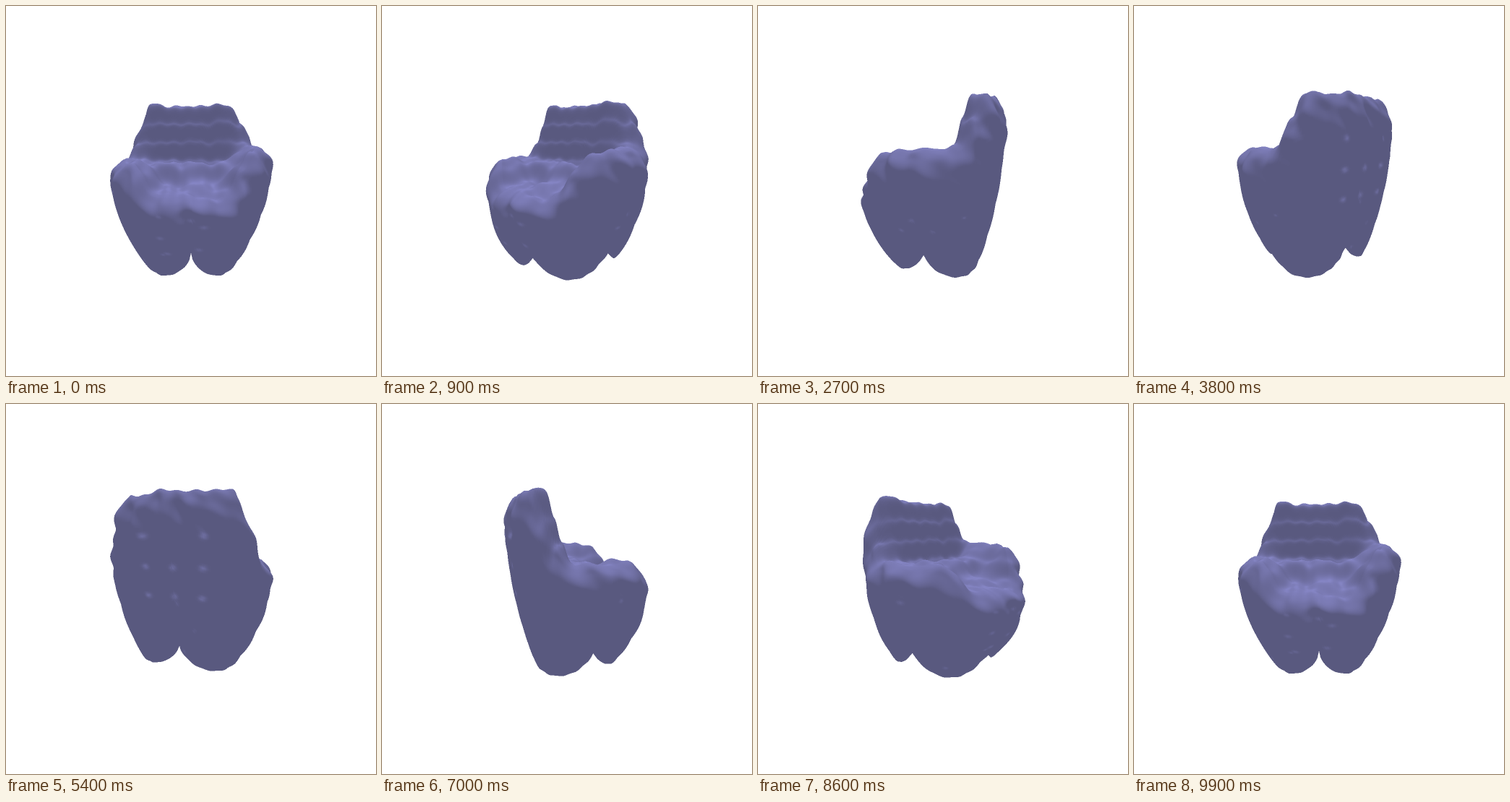
Animation of 512x512 px, one loop 10000 ms. Source, as an HTML page with a canvas:

```html
<!DOCTYPE html>
<html lang="en">
<head>
<meta charset="utf-8">
<title>Turning form</title>
<style>
html, body { margin: 0; width: 100%; height: 100%; overflow: hidden; background: #fff; }
canvas { display: block; width: 512px; height: 512px; }
</style>
</head>
<body>
<canvas id="stage" width="512" height="512"></canvas>
<script>
const STEPS = 100, STEP_MS = 100, TURN = Math.PI * 2, DEG = Math.PI / 180;
const { sin, cos, exp, abs, min, max } = Math;
const clamp = (x, lo, hi) => min(hi, max(lo, x));
const mix = (a, b, f) => a + (b - a) * f;
const smooth = (lo, hi, x) => { const f = clamp((x - lo) / (hi - lo), 0, 1); return f * f * (3 - 2 * f); };

let seed = 11;
const random = () => (seed = (seed * 16807) % 2147483647) / 2147483647;

// Mesh: rings around the vertical axis, first up the wall, then inward over the top
const NA = 260, WALL = 72, CAP = 60, NV = WALL + CAP, N = NA * NV;
const buf = () => new Float32Array(N);
const X = buf(), Y = buf(), Z = buf(), shade = buf(), px = buf(), py = buf(), pz = buf();
const RIM = 0.84, PEAK = 0.8;

const waves = Array.from({ length: 9 }, (_, i) => {
  const dir = random() * TURN, pitch = TURN / (20 + 5 * i);
  return { x: cos(dir) * pitch, z: sin(dir) * pitch, phase: random() * TURN };
});
const lumps = (x, z) => waves.reduce((sum, w) => sum + sin(w.x * x + w.z * z + w.phase), 0);

const radius = a => 99 + 11 * cos(a) - 6 * cos(2 * a) + 4 * cos(3 * a);
// Four feet with narrow gaps between them
const foot = a => -58 - 36 * Math.sqrt(abs(sin(2 * (a + 0.2 * sin(a)))));

// Top surface: sloping seat, two arms and a high back, all slightly terraced
function topHeight(x, z) {
  const seat = 36 - 22 * smooth(0, 70, z) + 4 * sin(z * TURN / 45);
  const low = mix(seat, 50 + 0.08 * x, smooth(30, 70, abs(x)));
  const back = smooth(12, 42, -z) * (1 - smooth(54, 96, abs(x)));
  const h = mix(low, 118, back);
  return h + 2.6 * sin(h * TURN / 26) + 0.9 * lumps(x, z);
}

const bulge = t => t < PEAK
  ? mix(0.66, 1, sin(t / PEAK * TURN / 4) ** 0.8)
  : mix(1, RIM, ((t - PEAK) / (1 - PEAK)) ** 2.5);

function buildBody() {
  for (let i = 0; i < NA; i++) {
    const a = i / NA * TURN, rad = radius(a), sa = sin(a), ca = cos(a);
    const rim = topHeight(RIM * rad * sa, RIM * rad * ca), low = foot(a);
    for (let j = 0; j < NV; j++) {
      const k = i * NV + j;
      let r, h;
      if (j === 0) {
        r = 0.3 * rad; h = -55;
      } else if (j < WALL) {
        const t = (j - 1) / (WALL - 1);
        const rough = smooth(0.6, 0.85, t) * (1 - smooth(0.92, 1, t));
        h = mix(low, rim, t);
        r = rad * bulge(t) + rough * (2 * sin(17 * a) + 1.2 * sin(9 * a + h * 0.2))
          + 0.8 * sin(23 * a + h * 0.12);
      } else {
        r = rad * RIM * (1 - (j - WALL + 1) / CAP);
        h = topHeight(r * sa, r * ca);
      }
      X[k] = r * sa; Y[k] = h; Z[k] = r * ca;
    }
  }
}

// Small ledges: a three by three grid on the back wall, others scattered
const ledges = [];
for (let row = 0; row < 3; row++) for (let col = 0; col < 3; col++) {
  if (row || col !== 1) ledges.push({ a: (158 + 23.5 * col) * DEG, h: 72 - 33 * row, w: 4.6, light: 0.32 });
}
for (let i = 0; i < 16; i++) {
  ledges.push({ a: random() * TURN, h: -75 + 85 * random(), w: 2 + 1.5 * random(), light: 0.18 });
}

function lightBody() {
  for (let i = 0; i < NA; i++) for (let j = 0; j < NV; j++) {
    const k = i * NV + j, a = i / NA * TURN;
    const e = (i + 1) % NA * NV + j, w = (i + NA - 1) % NA * NV + j;
    const n = i * NV + min(j + 1, NV - 1), s = i * NV + max(j - 1, 0);
    const ax = X[e] - X[w], ay = Y[e] - Y[w], az = Z[e] - Z[w];
    const bx = X[n] - X[s], by = Y[n] - Y[s], bz = Z[n] - Z[s];
    const nx = ay * bz - az * by, ny = az * bx - ax * bz, nz = ax * by - ay * bx;
    const up = j === NV - 1 ? 1 : ny / (Math.hypot(nx, ny, nz) || 1);
    let light = 0.56 * max(0, up - 0.2) / 0.8 + 1.5 * max(0, up - 0.95);
    if (j < WALL) for (const l of ledges) {
      const turn = abs(a - l.a), arc = min(turn, TURN - turn) * 95;
      light += l.light * exp(-((arc / l.w) ** 2) - ((Y[k] - l.h) / (l.w * 0.6)) ** 2);
    }
    shade[k] = clamp(light, 0, 0.9);
  }
}

// Camera slightly above the body
const DIST = 350, CE = cos(12 * DEG), SE = sin(12 * DEG);

function project(step) {
  const turn = step * TURN / (STEPS - 1), c = cos(turn), s = sin(turn);
  for (let k = 0; k < N; k++) {
    const x = X[k] * c - Z[k] * s, z = Z[k] * c + X[k] * s;
    const depth = z * CE + Y[k] * SE, m = DIST / (DIST - depth);
    px[k] = (256 + x * m - X0) * 2;
    py[k] = (256 - (Y[k] * CE - z * SE) * m - Y0) * 2;
    pz[k] = depth;
  }
}

// Rasteriser at double size
const X0 = 112, Y0 = 96, W = 576, H = 632;
const sheet = document.createElement("canvas");
sheet.width = W; sheet.height = H;
const sheetCtx = sheet.getContext("2d");
const image = sheetCtx.createImageData(W, H);
const pixels = new Uint32Array(image.data.buffer);
const zbuf = new Float32Array(W * H);
const ramp = Uint32Array.from({ length: 256 }, (_, i) => {
  const g = Math.round(89 + 70 * i / 255), b = Math.round(127 + 110 * i / 255);
  return (255 << 24 | b << 16 | g << 8 | g) >>> 0;
});

function triangle(a, b, c) {
  const ax = px[a], ay = py[a], bx = px[b], by = py[b], cx = px[c], cy = py[c];
  const area = (bx - ax) * (cy - ay) - (by - ay) * (cx - ax);
  if (abs(area) < 1e-6) return;
  const x1 = max(0, Math.ceil(min(ax, bx, cx) - .5)), x2 = min(W - 1, Math.floor(max(ax, bx, cx) - .5));
  const y1 = max(0, Math.ceil(min(ay, by, cy) - .5)), y2 = min(H - 1, Math.floor(max(ay, by, cy) - .5));
  for (let y = y1; y <= y2; y++) for (let x = x1; x <= x2; x++) {
    const u = x + .5 - ax, v = y + .5 - ay;
    const wb = (u * (cy - ay) - v * (cx - ax)) / area;
    const wc = ((bx - ax) * v - (by - ay) * u) / area;
    const wa = 1 - wb - wc;
    if (wa < -1e-4 || wb < -1e-4 || wc < -1e-4) continue;
    const z = wa * pz[a] + wb * pz[b] + wc * pz[c], o = y * W + x;
    if (z <= zbuf[o]) continue;
    zbuf[o] = z;
    pixels[o] = ramp[clamp((wa * shade[a] + wb * shade[b] + wc * shade[c]) * 255 | 0, 0, 255)];
  }
}

function raster() {
  zbuf.fill(-1e4);
  pixels.fill(0);
  for (let i = 0; i < NA; i++) {
    const p = i * NV, q = (i + 1) % NA * NV;
    for (let j = 0; j < NV - 1; j++) {
      triangle(p + j, q + j, p + j + 1);
      triangle(q + j, q + j + 1, p + j + 1);
    }
  }
}

const ctx = document.getElementById("stage").getContext("2d");
let shown = -1;

function draw(step) {
  if (step === shown) return;
  shown = step;
  project(step);
  raster();
  sheetCtx.putImageData(image, 0, 0);
  ctx.fillStyle = "#fff";
  ctx.fillRect(0, 0, 512, 512);
  ctx.drawImage(sheet, X0, Y0, W / 2, H / 2);
}

buildBody();
lightBody();
draw(0);
const start = performance.now();
function tick() {
  draw(Math.floor((performance.now() - start) / STEP_MS) % STEPS);
  requestAnimationFrame(tick);
}
requestAnimationFrame(tick);
</script>
</body>
</html>
```
